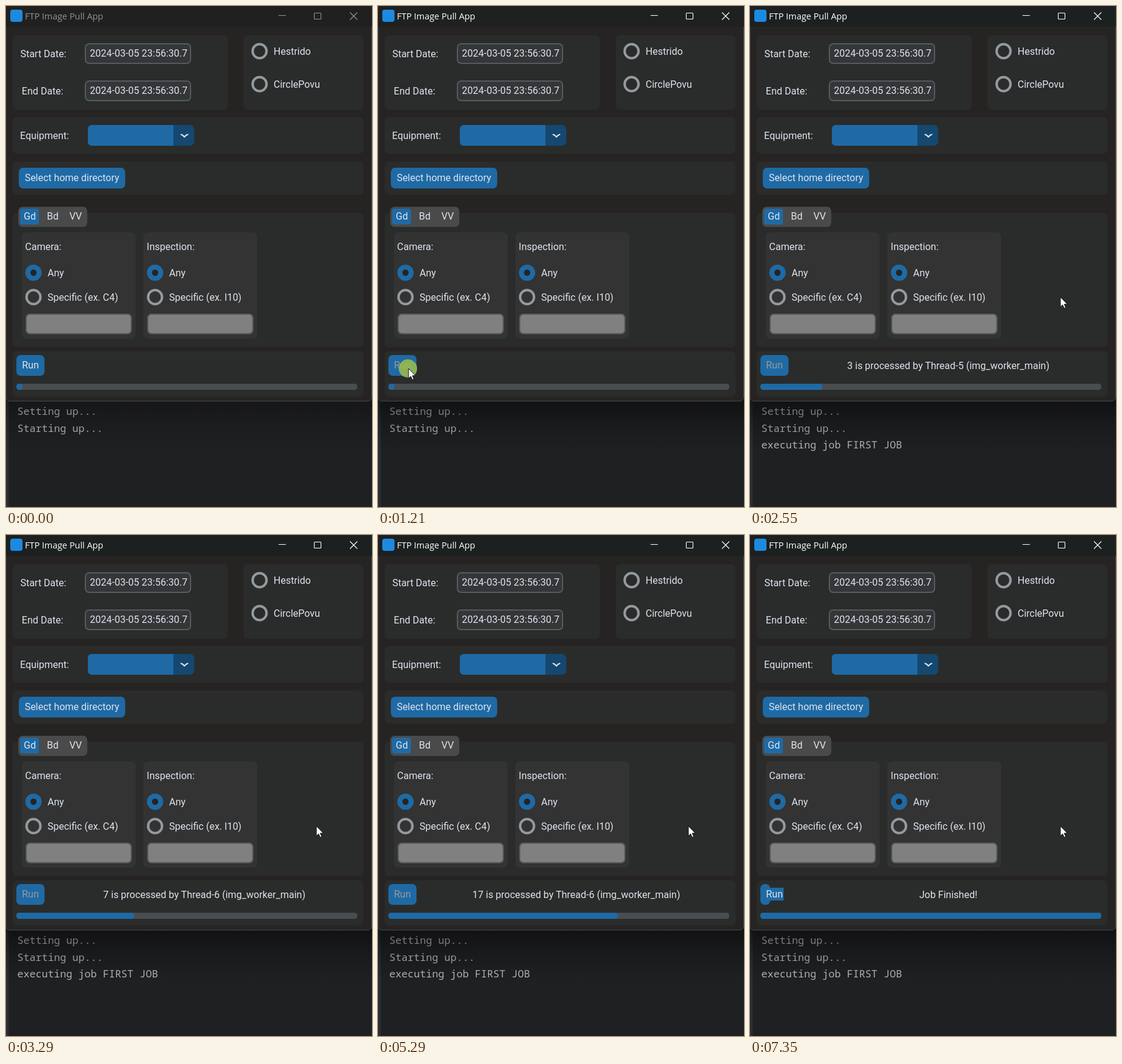
An HTML page that plays this animation: 599x821 px, repeating every 8000 ms.

```html
<!DOCTYPE html>
<html lang="en">
<head>
<meta charset="utf-8">
<title>FTP Image Pull App</title>
<style>
  html, body { margin: 0; width: 100%; height: 100%; overflow: hidden; background: #1e1f22; }
  svg { display: block; width: 599px; height: 821px; }
  text { font: 16px Roboto, sans-serif; fill: #dce4ee; white-space: pre; }
  text.title { font: 14.4px "Open Sans", "Noto Sans", sans-serif; fill: inherit; }
  text.mono { font: 16.7px "Noto Sans Mono", "DejaVu Sans Mono", monospace; fill: #b4b6bb; }
</style>
</head>
<body>
<svg id="stage" viewBox="0 0 599 821" xmlns="http://www.w3.org/2000/svg"></svg>
<script>
const LOOP = 8000;
const STEP = 70;
const BLUE = '#1f6aa5', DARK_BLUE = '#144870';
const WINDOW = '#262423', PANEL = '#2a2c2b', INNER = '#333333', BORDER = '#565b5e';

// Boxes are given by their left, top, right and bottom edges.
const box = (l, t, r, b, fill, radius = 7, extra = '') =>
  `<rect x="${l}" y="${t}" width="${r - l}" height="${b - t}" rx="${radius}" fill="${fill}" ${extra}/>`;
const label = (x, y, str, extra = '') => `<text x="${x}" y="${y}" ${extra}>${str}</text>`;
const centered = (x, y, str, extra = '') => label(x, y, str, `text-anchor="middle" ${extra}`);
const entry = (l, t, fill) =>
  box(l + 1, t + 1, l + 173, t + 33, fill, 6, `stroke="${BORDER}" stroke-width="2"`);
const radio = (x, y, str, on = false) =>
  `<circle cx="${x}" cy="${y}" r="${on ? 9.25 : 11.4}" fill="${on ? WINDOW : 'none'}"
    stroke="${on ? BLUE : '#949a9f'}" stroke-width="${on ? 8.2 : 4}"/>` + label(x + 23, y + 6, str);

const dateRow = (x, y, str) =>
  label(x, y + 23, str) + entry(129, y, '#343638') +
  label(137.3, y + 22, '2024-03-05 23:56:30.7');

const filter = (x, title, example) =>
  box(x, 371, x + 186, 545, INNER) + label(x + 5.3, 400, title) +
  radio(x + 19, 437, 'Any', true) + radio(x + 19, 477, `Specific (ex. ${example})`) +
  entry(x + 6, 504, '#808080');

const consoleLine = (y, str, extra = '') => label(18.4, y, str, `class="mono" ${extra}`);

document.getElementById('stage').innerHTML = `
  <defs>
    <linearGradient id="shade" x2="0" y2="1">
      <stop stop-color="#000"/><stop offset=".5" stop-color="#000" stop-opacity=".4"/>
      <stop offset="1" stop-color="#000" stop-opacity="0"/>
    </linearGradient>
  </defs>
  ${box(0, 630, 599, 821, '#1f2022', 0)}
  ${box(0, 630, 4.5, 821, '#2b2d30', 0)}
  ${consoleLine(670, 'Setting up...')}
  ${consoleLine(698, 'Starting up...')}
  ${consoleLine(725, 'executing job FIRST JOB', 'id="jobLine"')}
  ${box(0, 640, 599, 730, 'url(#shade)', 0, 'id="shadow"')}

  <path d="M0 0H598.5V640Q598.5 647.5 591 647.5H8Q0 647.5 0 640Z" fill="${WINDOW}" stroke="#46494a"/>
  ${box(0, 0, 599, 34, '#202020', 0, 'id="titleBar"')}
  ${box(7, 6, 27, 26, '#1c8ae0', 4)}
  <g id="titleItems">
    ${label(31, 22, 'FTP Image Pull App', 'class="title"')}
    <path d="M446 15.5H458M505.5 11.5H514.5Q515.5 11.5 515.5 12.5V20.5Q515.5 21.5 514.5 21.5H505.5Q504.5 21.5 504.5 20.5V12.5Q504.5 11.5 505.5 11.5ZM563 10.5L575 22.5M575 10.5L563 22.5"
      fill="none" stroke="currentColor" stroke-width="1.1"/>
  </g>

  ${box(11, 48, 363, 170, PANEL)}
  ${dateRow(23.4, 61, 'Start Date:')}
  ${dateRow(25.8, 122, 'End Date:')}
  ${box(389, 48, 585, 170, PANEL)}
  ${radio(415, 74, 'Hestrido')}
  ${radio(415, 128, 'CirclePovu')}

  ${box(11, 182, 585, 242, PANEL)}
  ${label(23, 218, 'Equipment:')}
  ${box(134, 195, 308, 229, DARK_BLUE)}
  <path d="M141 195H274V229H141Q134 229 134 222V202Q134 195 141 195Z" fill="${BLUE}"/>
  <path d="M286.5 210.5Q289 211 292 214.5Q295 211 297.5 210.5" fill="none" stroke="#dce4ee" stroke-width="2" stroke-linecap="round"/>

  ${box(11, 255, 585, 309, PANEL)}
  ${box(21, 265, 195, 299, BLUE)}
  ${centered(108, 287, 'Select home directory')}

  ${box(11, 339, 585, 559, PANEL)}
  ${box(20, 329, 133, 362, '#4a4a4a')}
  ${box(23, 332, 54, 358, BLUE, 4)}
  ${centered(39, 350, 'Gd')}${centered(76.5, 350, 'Bd')}${centered(114, 350, 'VV')}
  ${filter(26, 'Camera:', 'C4')}
  ${filter(225, 'Inspection:', 'I10')}

  ${box(11, 566, 585, 640, PANEL)}
  ${box(17, 572, 63, 606, BLUE, 7, 'id="runButton"')}
  <g id="runRedraw">${box(17, 572, 33, 606, BLUE)}${box(26, 578, 55, 599, BLUE, 0)}</g>
  ${centered(40, 594, 'Run', 'id="runText"')}
  ${centered(324.5, 595, '', 'id="status"')}
  ${box(17, 619, 575, 629, '#4a4d50', 4.5)}
  ${box(17, 619, 27, 629, BLUE, 4.5, 'id="bar"')}

  <circle id="click" cx="49" cy="594" r="15" fill="#9abb4c"/>
  <path id="cursor" d="M0 0V16.3L3.7 12.8L6.2 18.4L8.7 17.3L6.3 11.8H11.3Z" fill="#fff" stroke="#111" stroke-width="1"/>`;

const el = {};
document.querySelectorAll('#stage [id]').forEach(node => { el[node.id] = node; });
const set = (name, attr, value) => el[name].setAttribute(attr, value);

// Start time, finished images out of 30, last image, worker thread.
const PROGRESS = [
  [2210, 4, 1, 4], [2280, 5, 3, 5],
  [3220, 9, 8, 4], [3290, 10, 7, 6],
  [4230, 15, 10, 5],
  [5220, 19, 16, 4], [5290, 20, 17, 6],
  [6290, 25, 23, 4],
  [7290, 29, 28, 5],
];
const FINISHED = 7350;

// Cursor moves: start, steps, from, to, easing of the stepped progress.
const MOVES = [
  { start: 260, steps: 9, from: [254, 680], to: [50, 594], ease: p => p * p * (3 - 2 * p) },
  { start: 1940, steps: 6, from: [50, 594], to: [508, 477], ease: p => 1 - (1 - p) ** 5.4 },
];

function cursorAt(t) {
  const move = MOVES.filter(m => t >= m.start).pop();
  if (!move) return null;
  const step = Math.floor((t - move.start) / STEP);
  const first = move.start > 1000 ? 1 : 0;
  const p = move.ease(Math.min(1, (step + first) / (move.steps + first)));
  return move.from.map((v, i) => Math.round(v + (move.to[i] - v) * p));
}

function render(t) {
  const focused = t >= 1210;
  const running = focused && t < FINISHED;
  const done = t >= FINISHED;

  set('titleBar', 'fill', t >= 1300 ? '#1c2021' : focused ? '#1f2020' : '#202020');
  el.titleItems.style.color = el.titleItems.style.fill = focused ? '#fff' : '#929292';
  set('shadow', 'opacity', focused ? .5 : .33);
  set('jobLine', 'visibility', t >= 1390 ? 'visible' : 'hidden');

  const pos = cursorAt(t);
  set('cursor', 'visibility', pos ? 'visible' : 'hidden');
  if (pos) set('cursor', 'transform', `translate(${pos})`);
  const hover = pos && !focused && pos[0] < 63 && pos[1] < 606;

  const fade = Math.floor((t - 1210) / 90);
  set('click', 'opacity', focused && fade < 3 ? .88 * (1 - fade / 3) : 0);

  set('runButton', 'fill', hover ? DARK_BLUE : BLUE);
  set('runButton', 'visibility', done ? 'hidden' : 'visible');
  set('runRedraw', 'visibility', done ? 'visible' : 'hidden');
  el.runText.style.fill = running ? '#999' : '#dce4ee';

  const stage = PROGRESS.filter(s => t >= s[0]).pop();
  const [, count, image, thread] = stage || [0, 0];
  const status = done ? 'Job Finished!'
    : stage ? `${image} is processed by Thread-${thread} (img_worker_main)` : '';
  if (el.status.textContent !== status) el.status.textContent = status;
  set('bar', 'width', 10 + 548 * (done ? 1 : count / 30));
}

const origin = performance.now();
function tick() {
  render((performance.now() - origin) % LOOP);
  requestAnimationFrame(tick);
}
tick();
</script>
</body>
</html>
```
